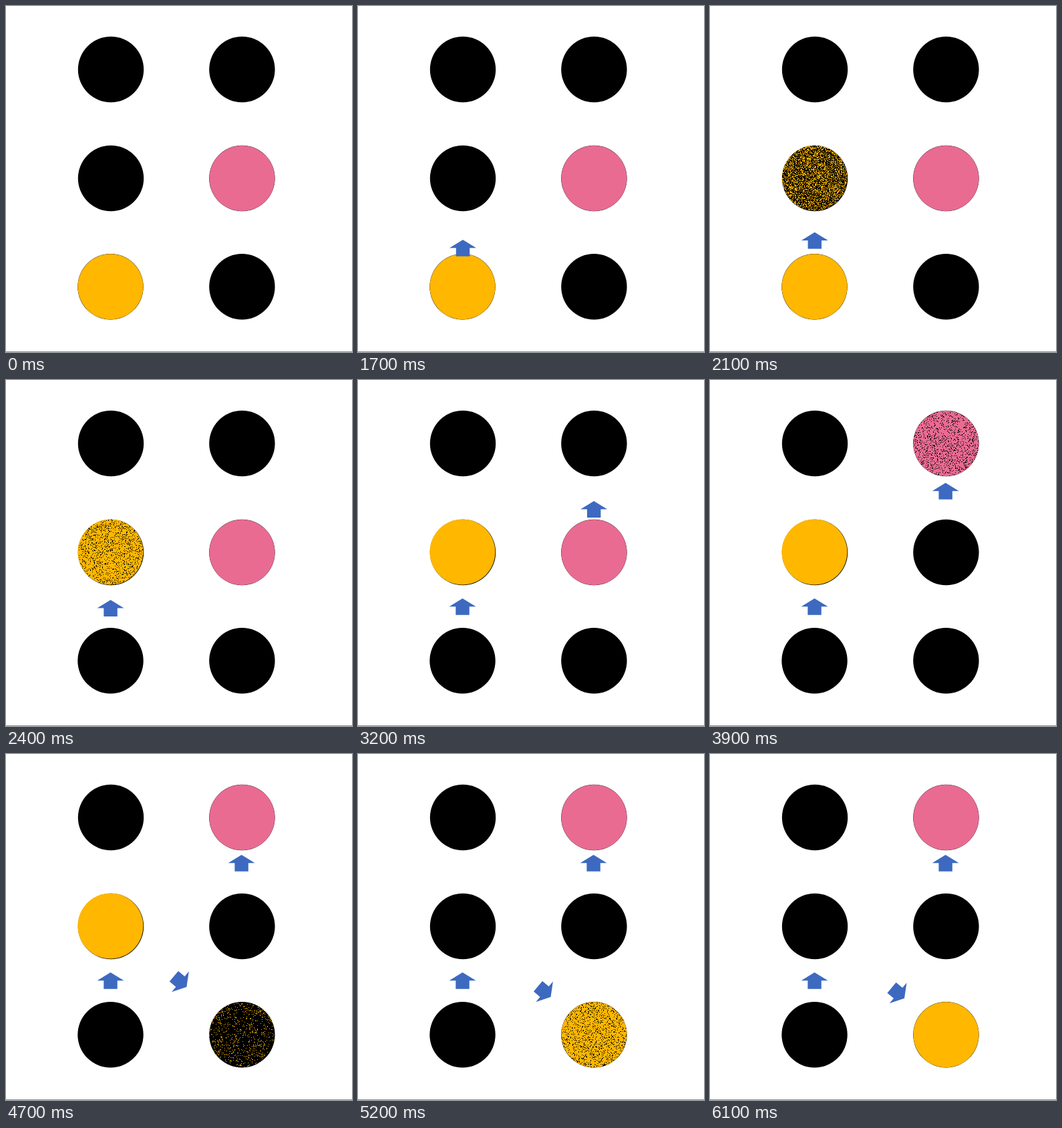
Write an HTML page with a canvas that moves like this. It is 518x518 px and loops after 7.2 s.

```html
<!DOCTYPE html>
<html lang="en">
<head>
<meta charset="utf-8">
<title>Moving dots</title>
<style>
  html, body { margin: 0; width: 100%; height: 100%; overflow: hidden; background: #fff; }
  canvas { display: block; width: 518px; height: 518px; }
</style>
</head>
<body>
<canvas id="stage" width="518" height="518"></canvas>
<script>
const ctx = document.getElementById("stage").getContext("2d");
const LOOP = 7200, STEP = 100, MOVE = 1000, R = 49.2;
const YELLOW = "#ffb700", PINK = "#e96b92", BLUE = "#3d69c0";

const spots = {
  topLeft: [157, 95], topRight: [353.4, 95],
  midLeft: [157, 258], midRight: [353.4, 258],
  lowLeft: [156.5, 420.3], lowRight: [353.4, 420.3]
};

// Each move: arrow appears, glides, the new dot dissolves in, the old one turns black.
const moves = [
  { show: 1700, start: 1600, swap: 2400, from: "lowLeft", to: "midLeft", color: YELLOW,
    a: [157, 350.5], b: [156.5, 327], turn: 0, shift: [-0.6, -0.4] },
  { show: 3000, start: 3100, swap: 3700, from: "midRight", to: "topRight", color: PINK,
    a: [353.2, 182], b: [352.6, 151], turn: 0, shift: [0, 0] },
  { show: 4500, start: 4400, swap: 5200, from: "midLeft", to: "lowRight", color: YELLOW,
    a: [265, 344.3], b: [291, 365.8], turn: 130, shift: [0, 0] }
];

const clamp = x => Math.min(1, Math.max(0, x));
const ease = p => (1 - Math.cos(Math.PI * p)) / 2;

function disc([x, y], r, color) {
  ctx.fillStyle = color;
  ctx.beginPath();
  ctx.arc(x, y, r, 0, 2 * Math.PI);
  ctx.fill();
}

function colored([x, y], color, [dx, dy] = [0, 0]) {
  disc([x + dx, y + dy], R - 0.2, color);
}

function random(seed) {
  return () => {
    seed = (seed + 0x6d2b79f5) | 0;
    let n = Math.imul(seed ^ (seed >>> 15), 1 | seed);
    n = (n + Math.imul(n ^ (n >>> 7), 61 | n)) ^ n;
    return ((n ^ (n >>> 14)) >>> 0) / 4294967296;
  };
}

function dissolve(spot, color, [dx, dy], amount, seed) {
  const [x, y] = [spot[0] + dx, spot[1] + dy];
  const next = random(seed);
  const left = Math.floor(x - R), top = Math.floor(y - R);
  ctx.save();
  ctx.beginPath();
  ctx.arc(x, y, R - 0.2, 0, 2 * Math.PI);
  ctx.clip();
  ctx.fillStyle = color;
  for (let j = 0; j < 100; j++)
    for (let i = 0; i < 100; i++)
      if (next() < amount) ctx.fillRect(left + i, top + j, 1, 1);
  ctx.restore();
}

function arrow(x, y, turn) {
  ctx.save();
  ctx.translate(x, y);
  ctx.rotate(turn * Math.PI / 180);
  ctx.fillStyle = BLUE;
  ctx.beginPath();
  [[0, 0], [20, 12.3], [10.2, 12.3], [10.2, 24.8], [-10.2, 24.8], [-10.2, 12.3], [-20, 12.3]]
    .forEach(([px, py]) => ctx.lineTo(px, py));
  ctx.fill();
  ctx.restore();
}

function draw(t) {
  ctx.fillStyle = "#fff";
  ctx.fillRect(0, 0, 518, 518);
  ctx.fillStyle = "#8f8f8f";
  ctx.fillRect(0, 517, 518, 1);
  for (const name in spots) disc(spots[name], R, "#000");

  const dots = { lowLeft: [YELLOW], midRight: [PINK] };
  const active = moves.filter(m => t >= m.show);
  const fading = [];
  active.forEach((m, i) => {
    const amount = clamp(((t - m.start) / MOVE - 0.24) / 0.66);
    if (amount === 1) dots[m.to] = [m.color, m.shift];
    else fading.push([spots[m.to], m.color, m.shift, amount, 11 + i]);
    if (t >= m.swap) delete dots[m.from];
  });
  for (const name in dots) colored(spots[name], ...dots[name]);
  fading.forEach(f => dissolve(...f));

  for (const { start, a, b, turn } of active) {
    const k = ease(clamp((t - start) / MOVE));
    arrow(a[0] + (b[0] - a[0]) * k, a[1] + (b[1] - a[1]) * k, turn);
  }
}

let last = -1;
function tick(now) {
  const t = Math.floor((now % LOOP) / STEP) * STEP;
  if (t !== last) draw(last = t);
  requestAnimationFrame(tick);
}
draw(0);
requestAnimationFrame(tick);
</script>
</body>
</html>
```
